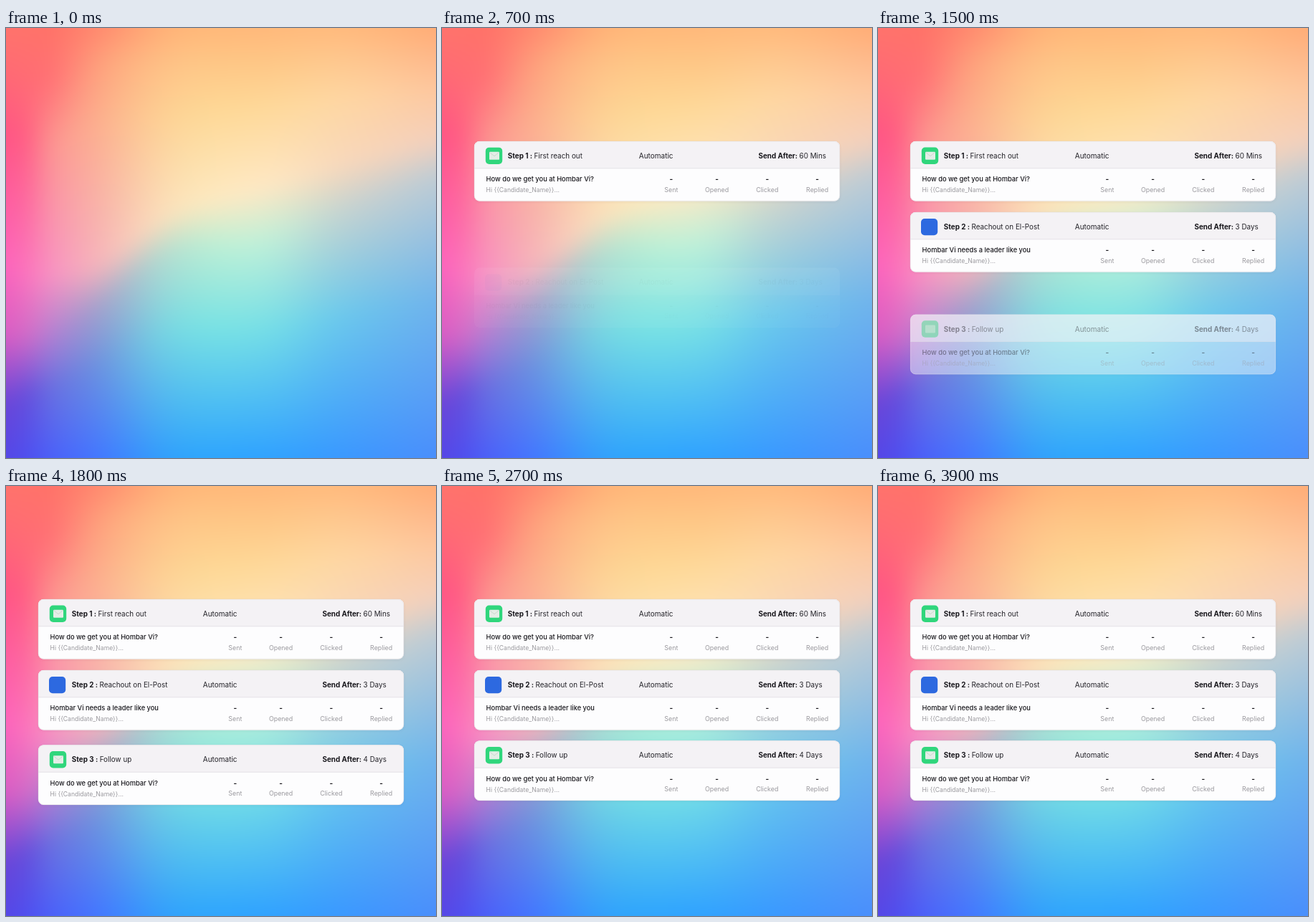
Write an HTML page with a canvas that moves like this. It is 600 by 600 pixels and loops after 4000 ms.

```html
<!DOCTYPE html>
<html lang="en">
<head>
<meta charset="utf-8">
<title>Outreach steps</title>
<style>
  html, body { margin: 0; width: 100%; height: 100%; overflow: hidden; }
  canvas { display: block; width: 600px; height: 600px; }
</style>
</head>
<body>
<canvas id="stage" width="600" height="600"></canvas>
<script>
const SIZE = 600, LOOP = 4000, TICK = 100;
const ctx = document.getElementById('stage').getContext('2d');

// Warped gradient: each column lists its inner stop heights and its seven colours.
const columns = [
  { x: 0, y: [60, 150, 330, 430, 525], c: '#ff736c #ff6a74 #ff5585 #fd64bc #d85cc4 #6a45d8 #5546e6' },
  { x: 30, y: [70, 150, 345, 430, 510], c: '#ff736a #ff6c74 #ff6284 #fb76be #cf6cc8 #6650dc #4e50f0' },
  { x: 60, y: [75, 160, 345, 420, 500], c: '#ff7268 #ff7276 #fc9090 #f890c2 #bc80d0 #6a6de0 #4b5ff8' },
  { x: 130, y: [50, 130, 330, 385, 470], c: '#ff8a6e #fea07c #fcb08e #f6b6bc #a6a4cc #6c94e0 #4278ff' },
  { x: 230, y: [50, 120, 260, 310, 420], c: '#ffb277 #fec286 #fdd294 #fbe2bd #b8e0d0 #78d8e2 #30a0fc' },
  { x: 350, y: [50, 110, 225, 300, 420], c: '#ffb87a #fec786 #fed898 #fee8c4 #bff0d8 #76dfe6 #2fa2ff' },
  { x: 470, y: [45, 100, 190, 250, 400], c: '#ffb97c #fec78e #fed6a2 #f8d8bc #c8d4d0 #6cc8ec #3a98ff' },
  { x: 600, y: [40, 90, 155, 205, 380], c: '#ffac76 #feb88a #fdc8a0 #f4d0bc #c0ccd4 #70b4ec #4a8efc' }
].map(({ x, y, c }) => ({
  x,
  y: [0, ...y, SIZE],
  c: c.split(' ').map(hex => [1, 3, 5].map(i => parseInt(hex.slice(i, i + 2), 16)))
}));

const clamp = (v, lo, hi) => Math.min(hi, Math.max(lo, v));

function makeCanvas(size) {
  const canvas = document.createElement('canvas');
  canvas.width = canvas.height = size;
  return canvas;
}

// Smooth (Hermite) interpolation of one column property at x.
function across(x, value) {
  const at = i => columns[clamp(i, 0, columns.length - 1)];
  const i = Math.max(1, columns.findIndex(col => col.x >= x));
  const a = at(i - 1), b = at(i), span = b.x - a.x, k = (x - a.x) / span;
  const slope = (p, q) => (value(q) - value(p)) / (q.x - p.x) * span;
  const inSlope = slope(at(i - 2), b), outSlope = slope(a, at(i + 1));
  const ease = k * k * (3 - 2 * k);
  return value(a) + (value(b) - value(a)) * ease
    + inSlope * k * (1 - k) ** 2 - outSlope * k * k * (1 - k);
}

function paintBackground() {
  const pad = 45;
  const sheet = makeCanvas(SIZE + 2 * pad), s = sheet.getContext('2d');
  for (let px = 0; px < sheet.width; px++) {
    const x = clamp(px - pad, 0, SIZE);
    const fill = s.createLinearGradient(0, pad, 0, pad + SIZE);
    columns[0].y.forEach((_, n) => {
      const rgb = [0, 1, 2].map(j => clamp(Math.round(across(x, col => col.c[n][j])), 0, 255));
      fill.addColorStop(clamp(across(x, col => col.y[n]) / SIZE, 0, 1), `rgb(${rgb})`);
    });
    s.fillStyle = fill;
    s.fillRect(px, 0, 1, sheet.height);
  }
  const result = makeCanvas(SIZE), r = result.getContext('2d');
  r.filter = 'blur(13px)';
  r.drawImage(sheet, -pad, -pad);
  return result;
}

const background = paintBackground();

const cards = [
  { top: 158, start: 18, icon: 'mail', title: 'First reach out', delay: '60 Mins', subject: 'How do we get you at Hombar Vi?' },
  { top: 257, start: 692, icon: 'square', title: 'Reachout on El-Post', delay: '3 Days', subject: 'Hombar Vi needs a leader like you' },
  { top: 355.4, start: 1366, icon: 'mail', title: 'Follow up', delay: '4 Days', subject: 'How do we get you at Hombar Vi?' }
];
const stats = [['Sent', 319.8], ['Opened', 383.6], ['Clicked', 453.8], ['Replied', 523.6]];
const CARD = { x: 45, w: 510, h: 83.5, head: 37.8, r: 7.5 };
const RISE = { distance: 80, duration: 750, fade: 300 };

function text(str, x, y, size, weight, color, align = 'left') {
  ctx.font = `${weight} ${size}px Inter, sans-serif`;
  ctx.fillStyle = color;
  ctx.textAlign = align;
  ctx.fillText(str, x, y);
  return x + ctx.measureText(str).width;
}

function roundRect(x, y, w, h, r, fill) {
  ctx.beginPath();
  ctx.roundRect(x, y, w, h, r);
  ctx.fillStyle = fill;
  ctx.fill();
}

function labelled(label, value, x, y) {
  const end = text(label, x, y, 9.9, 700, '#18171c');
  text(value, end + 2.4, y, 9.9, 400, '#242329');
}

function mailIcon() {
  roundRect(60.8, 8.6, 23.4, 23.4, 5, '#30d67c');
  roundRect(66, 14.8, 14, 11, 1.2, '#e4ede7');
  ctx.beginPath();
  ctx.moveTo(66.4, 15.4);
  ctx.lineTo(73, 20.8);
  ctx.lineTo(79.6, 15.4);
  ctx.strokeStyle = '#c3d2c9';
  ctx.lineWidth = 0.8;
  ctx.stroke();
}

function drawCard(card, index, time) {
  const age = time - card.start;
  if (age <= 0) return;
  const rest = 1 - clamp(age / RISE.duration, 0, 1);
  const { x, w, h, head, r } = CARD;

  ctx.save();
  ctx.globalAlpha = clamp(age / RISE.fade, 0, 1);
  ctx.translate(0, card.top + RISE.distance * rest ** 3);

  ctx.save();
  ctx.shadowColor = 'rgba(70, 60, 90, .07)';
  ctx.shadowBlur = 4;
  ctx.shadowOffsetY = 1;
  roundRect(x, 0, w, h, r, '#fdfdfe');
  ctx.restore();
  roundRect(x, 0, w, head, [r, r, 0, 0], '#f4f2f5');
  ctx.fillStyle = '#e4e2e7';
  ctx.fillRect(x, head - 0.5, w, 1);
  ctx.beginPath();
  ctx.roundRect(x + 0.3, 0.3, w - 0.6, h - 0.6, r);
  ctx.strokeStyle = '#e9e6e9';
  ctx.lineWidth = 0.7;
  ctx.stroke();

  if (card.icon === 'mail') mailIcon();
  else roundRect(60, 9, 23.2, 23.2, 5, '#2d69e0');

  labelled(`Step ${index + 1} :`, card.title, 91.8, 23.8);
  text('Automatic', 274.8, 23.8, 10, 400, '#242329');
  labelled('Send After:', card.delay, 441.5, 23.8);
  text(card.subject, 61.6, 56.2, 9.3, 500, '#18171c');
  text('Hi {{Candidate_Name}}...', 61.6, 71.2, 8.6, 400, '#9a999e');
  for (const [name, center] of stats) {
    text('-', center, 56.2, 10, 700, '#18171c', 'center');
    text(name, center, 71, 8.9, 400, '#9a999e', 'center');
  }
  ctx.restore();
}

function frame(now) {
  const time = Math.floor((now % LOOP) / TICK) * TICK;
  ctx.drawImage(background, 0, 0);
  cards.forEach((card, index) => drawCard(card, index, time));
  requestAnimationFrame(frame);
}

requestAnimationFrame(frame);
</script>
</body>
</html>
```
